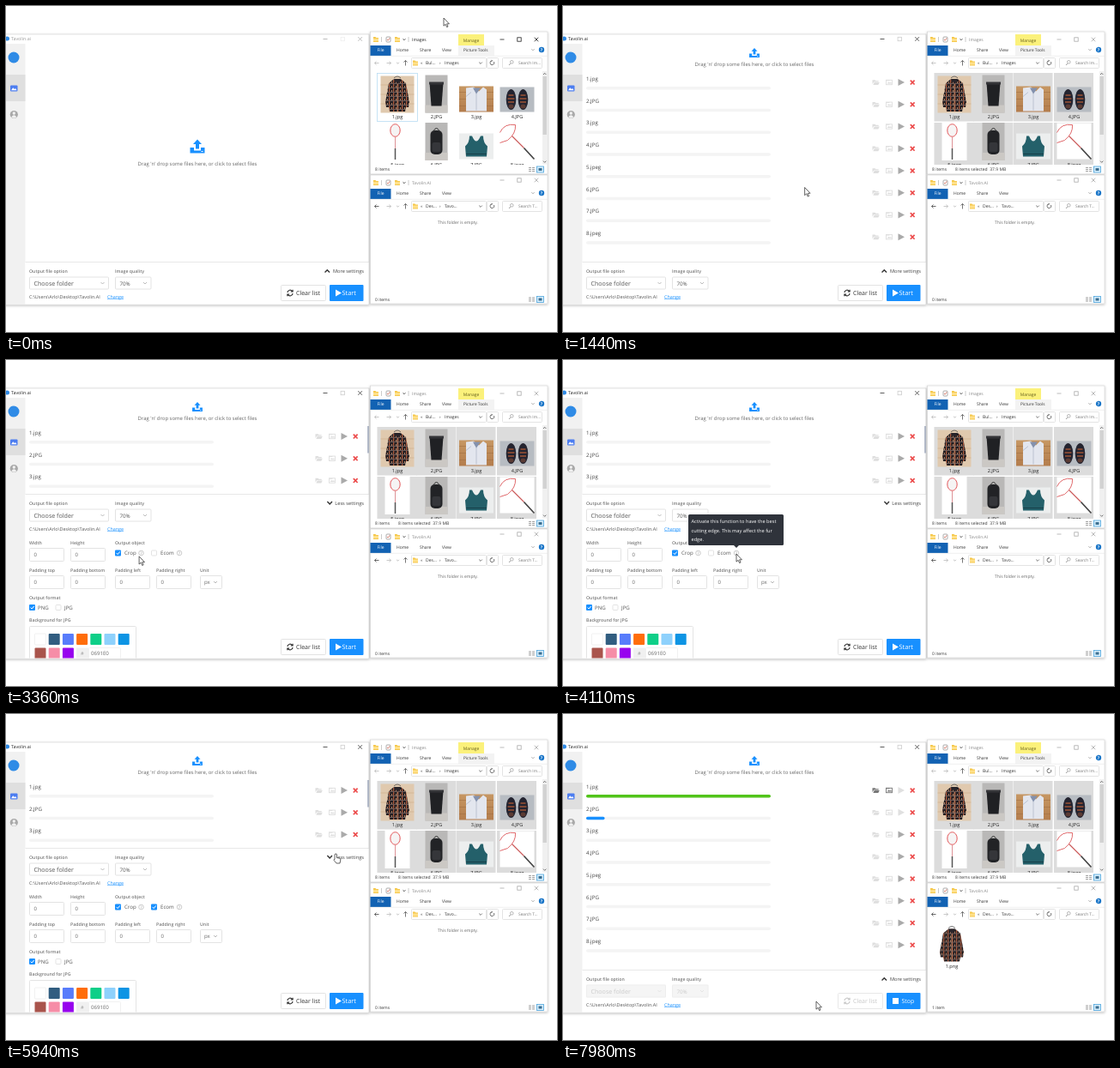
Write an HTML page that moves like this. It is 642x380 px and loops after 8000 ms.

```html
<!DOCTYPE html>
<html lang="en">
<head>
<meta charset="utf-8">
<title>Bulk background remover</title>
<style>
html, body { margin: 0; width: 100%; height: 100%; overflow: hidden; background: #fff; }
svg { display: block; width: 642px; height: 380px; }
text { font-family: "Open Sans", "Noto Sans", sans-serif; text-rendering: geometricPrecision; white-space: pre; }
</style>
</head>
<body>
<svg id="stage" viewBox="0 0 642 380" xmlns="http://www.w3.org/2000/svg"></svg>
<script>
(() => {
const LOOP = 8000;
const BLUE = '#1890ff';
const stage = document.getElementById('stage');

// Markup helpers
const text = (x, y, s, size = 5, fill = '#333', extra = '') =>
  `<text x="${x}" y="${y}" font-size="${size}" fill="${fill}" ${extra}>${s}</text>`;
const rect = (x, y, w, h, fill = 'none', extra = '') =>
  `<rect x="${x}" y="${y}" width="${w}" height="${h}" fill="${fill}" ${extra}/>`;
const box = (x, y, w, h, fill = '#fff', stroke = '#dcdcdc', r = 1) =>
  rect(x + .5, y + .5, w - 1, h - 1, fill, `stroke="${stroke}" stroke-width=".8" rx="${r}"`);
const line = (d, stroke = '#777', w = .8, extra = '') =>
  `<path d="${d}" fill="none" stroke="${stroke}" stroke-width="${w}" ${extra}/>`;
const shape = (d, fill, extra = '') => `<path d="${d}" fill="${fill}" ${extra}/>`;
const disc = (x, y, r, fill) => `<circle cx="${x}" cy="${y}" r="${r}" fill="${fill}"/>`;
const group = (id, body, extra = '') => `<g id="${id}" ${extra}>${body}</g>`;
const at = (x, y, body, s = 1) => `<g transform="translate(${x} ${y}) scale(${s})">${body}</g>`;
const chevron = (x, y, stroke = '#999', w = .8, r = 2) =>
  line(`M${x - r} ${y - r / 2}l${r} ${r}l${r} ${-r}`, stroke, w);
const folder = (x, y) =>
  shape(`M${x - 3} ${y - 3}h2.5l1 1h2.5v5h-6z`, '#f5c84c') + rect(x - 3, y - 1, 6, 3, '#ffe08a');

function windowButtons(x, y, gap, ink, boxInk = ink) {
  return line(`M${x - 2.5} ${y}h5`, ink) +
    rect(x + gap - 2.2, y - 2.2, 4.4, 4.4, 'none', `stroke="${boxInk}" stroke-width=".8"`) +
    line(`M${x + 2 * gap - 2.3} ${y - 2.3}l4.6 4.6m0 -4.6l-4.6 4.6`, ink);
}

const defs = `<defs>
  <pattern id="plaid" width="5" height="5" patternUnits="userSpaceOnUse">
    ${rect(0, 0, 5, 5, '#211e22')}${rect(0, 0, 1.3, 5, '#a9583c')}${rect(0, 2, 5, 1, '#6a5a58')}${rect(3, 0, .8, 2, '#d79a72')}
  </pattern>
  <linearGradient id="wood" x2="0" y2="1"><stop stop-color="#c69763"/><stop offset="1" stop-color="#b47d4d"/></linearGradient>
  <filter id="shadow" x="-10%" y="-10%" width="120%" height="120%">
    <feDropShadow dx="0" dy="1" stdDeviation="1.6" flood-color="#000" flood-opacity=".28"/>
  </filter>
  <clipPath id="files">${rect(425, 75, 200, 110)}</clipPath>
  <clipPath id="app">${rect(0, 33, 423, 314.5)}</clipPath>
</defs>`;

// Product pictures, each around its own centre
const jacket =
  line('M-4 -19q4 -4 8 0', '#555', .8) +
  shape('M-4 -18L4 -18L10 -13L14 9L13 15L10 15L9 20H-9L-10 15L-13 15L-14 9L-10 -13Z', 'url(#plaid)') +
  line('M0 -17V20', '#d39a74', .7) + shape('M-4 -18L0 -12L4 -18Z', '#28242a');
const jacketPhoto = rect(-19.5, -21.5, 39, 43, '#e0c9ae') +
  line('M-19.5 -11H19.5M-19.5 0H19.5M-19.5 11H19.5', '#cbab88', .6) + jacket;
const greyPhoto = rect(-13, -22, 26, 44, '#b9b8b7') + rect(-13, 13, 26, 9, '#cbc8c4');
const cup = shape('M-8 -13H8L6 14H-6Z', '#202124') + rect(-8.5, -14, 17, 3, '#343538');
const shirt = rect(-20, -15, 40, 30, 'url(#wood)') +
  line('M-20 -8H20M-20 0H20M-20 8H20', '#9b693e', .5) +
  shape('M-12 -13L-3 -14L3 -9L8 -14L12 -11V14H-12Z', '#e3e6ee') +
  shape('M-4 -13L0 -6L5 -13Z', '#8391ad') + line('M0 -7V13M-12 -3L-6 -8', '#aab2c5', .7);
const shoe = `<ellipse rx="5.8" ry="12" fill="#242430"/>` +
  line('M-3 -5H3M-4 -1H4M-3.5 3H3.5', '#d86837', 1.2) + `<ellipse cy="8" rx="3" ry="2.5" fill="#5b3b34"/>`;
const shoes = rect(-20, -14.5, 40, 29, '#b7bcc2') + at(-7, 0, shoe) + at(7, 0, shoe);
const racket = rect(-14.5, -22, 29, 44, '#fff') +
  `<ellipse cx="-2.5" cy="-13" rx="5.7" ry="7.3" fill="#f6f4f4" stroke="#e4585b" stroke-width="1"/>` +
  line('M-2.5 -5.5V8', '#d5777b', .8) + line('M-2.5 8V21', '#555', 1.5);
const bag = rect(-7, -13, 14, 28, '#222326', 'rx="5"') + rect(-5, 1, 10, 11, '#35363a', 'rx="2"') +
  line('M-3 -13q3 -5 6 0', '#333', 1);
const vest = rect(-20, -15, 40, 30, '#eceeee') +
  shape('M-8 -12L-5 -12Q0 0 5 -12L8 -12Q8 -4 13 0L12 12H-12L-13 0Q-8 -4 -8 -12Z', '#24606a') +
  line('M-12 9H12', '#163f49', 1);
const racketHead = rect(-20, -21, 40, 42, '#fff') +
  line('M-20 -10Q-15 -21 -2 -19Q-1 -9 -11 -1L-20 2', '#e0686b', 1) +
  line('M-6 -6L8 8', '#ca5656', 1.1) + line('M8 8L20 21', '#444', 1.7);

const columns = [456, 501.5, 548, 595.5];
const photos = [[jacketPhoto, 103], [greyPhoto + cup, 102.5], [shirt, 108.5], [shoes, 109],
                [racket, 158], [greyPhoto + bag, 158], [vest, 163.5], [racketHead, 157.5]];
const names = ['1.jpg', '2.JPG', '3.jpg', '4.JPG', '5.jpeg', '6.JPG', '7.JPG', '8.jpeg'];

function explorer(y, h, p) {
  const r = y + 21;
  return rect(424.5, y, 206.5, h, '#fff', 'stroke="#cfcfcf" stroke-width=".6" filter="url(#shadow)"') +
    folder(431, y + 9) + line(`M437.5 ${y + 6}v6M469 ${y + 6}v6`, '#aaa', .6) +
    box(442.5, y + 5.5, 6, 7, '#fff', '#999') + line(`M444 ${y + 9}l1.2 1.2l2 -3`, '#d36b5b') +
    folder(456, y + 9) + chevron(464, y + 9, '#444', 1, 1.4) +
    text(473, y + 11, p.title, 5, '#888', `id="${p.id}"`) +
    rect(424.5, y + 16, 24, 12, '#1262b3') + text(436.5, r + 2, 'File', 5, '#fff', 'text-anchor="middle"') +
    text(455, r + 2, 'Home') + text(482, r + 2, 'Share') + text(508, r + 2, 'View') +
    chevron(614, r, '#888', .7, 1.6) + disc(624, r, 3.2, '#1b76c8') +
    text(624, r + 1.8, '?', 5, '#fff', 'text-anchor="middle" font-weight="700"') +
    line(`M425 ${y + 28.3}H631`, '#e2e2e2', .6) +
    line(`M434.5 ${y + 36.5}h-5m2 -2l-2 2l2 2`, p.back) +
    line(`M443.5 ${y + 36.5}h5m-2 -2l2 2l-2 2`, '#bbb') + chevron(456.5, y + 36.5, '#999', .7, 1.3) +
    line(`M465.5 ${y + 39.5}v-6m-2 2l2 -2l2 2`, '#555') +
    box(472, y + 30, 88, 13) + folder(477, y + 36.5) + text(483, y + 38, '«', 5, '#555') +
    text(489, y + 38.3, p.parent) + text(505, y + 38, '›') + text(511, y + 38.3, p.here) +
    chevron(553, y + 36.5, '#555', .8, 1.8) + box(560, y + 30, 14, 13) +
    line(`M568.5 ${y + 35}a2.4 2.4 0 1 1 -2 -1.2l-1 -1m1 1l-1 1`, '#555', .8) +
    box(578, y + 30, 47, 13) + line(`M586 ${y + 39}l2 -2.2`, '#888') +
    `<circle cx="589.3" cy="${y + 35.3}" r="1.8" fill="none" stroke="#888" stroke-width=".6"/>` +
    text(597, y + 38.3, p.find, 4.8, '#777');
}
const viewIcons = y => line(`M609 ${y - 2}h3m1 0h3M609 ${y}h3m1 0h3M609 ${y + 2}h3m1 0h3`, '#888', .8) +
  box(618, y - 4, 9, 8, '#d8effd', '#4ba3db', 0) + rect(620.5, y - 1.5, 4, 3, '#3c6f91');

const cell = x => `<path d="M${x - 23.5} 78h46v56.5h-46zm0 58h46v50h-46z"/>`;

const imagesWindow = explorer(30, 166, { id: 'imgTitle', title: 'Images', back: '#bbb', parent: 'Bul...', here: 'Images', find: 'Search Im...' }) +
  rect(527, 33, 30, 13, '#fbf17b') + text(542, 41.5, 'Manage', 5, '#665f1e', 'text-anchor="middle"') +
  rect(527, 46, 42, 11.8, '#f3f3f3') + text(533, 53, 'Picture Tools', 4.8) +
  group('imgOn', windowButtons(578, 39, 20, '#222')) + group('imgOff', windowButtons(578, 39, 20, '#aaa')) +
  rect(625, 76, 5.5, 108.5, '#f0f0f0') + rect(625.5, 82, 4.5, 68, '#d2d2d2') +
  line('M626 80l1.7 -1.7l1.7 1.7', '#555') + chevron(627.7, 181.5, '#555', .8, 1.7) +
  `<g clip-path="url(#files)">` + group('cells', columns.map(cell).join('')) +
  group('focus', rect(432.5, 78.5, 47, 56, 'none', 'stroke="#b9dcf3" stroke-width=".8"')) +
  photos.map(([art, y], i) => at(columns[i % 4], y, art) +
    text(columns[i % 4], i < 4 ? 131 : 186.5, names[i], 5.6, '#222', 'text-anchor="middle"')).join('') + '</g>' +
  text(430, 192.3, '8 items') + group('picked', text(457, 192.3, '8 items selected  37.9 MB')) + viewIcons(190.5);

const outWindow = explorer(197, 150, { id: 'outTitle', title: 'Tavolin.AI', back: '#444', parent: 'Des...', here: 'Tavo...', find: 'Search T...' }) +
  windowButtons(578, 203, 20, '#aaa') +
  group('empty', text(526.5, 254, 'This folder is empty.', 5, '#666', 'text-anchor="middle"') + text(430, 344.3, '0 items')) +
  group('saved', at(453, 268.5, jacket) + text(453, 295.5, '1.png', 5.6, '#222', 'text-anchor="middle"') + text(430, 344.3, '1 item')) +
  viewIcons(342);

// App pieces
const upload = shape('M0 -8L5 -2.5H2V3H-2V-2.5H-5Z', BLUE) +
  shape('M-8.5 1.5H-4V5H4V1.5H8.5V8H-8.5Z', BLUE) + rect(4.5, 5.5, 2, 1, '#fff');
const label = (x, y, s) => text(x, y + 2, s, 5.2, '#777', 'font-weight="600"');
const input = (x, y) => box(x, y, 41, 16) + text(x + 5.5, y + 10.4, '0', 6, '#666');
const tick = (x, y) => rect(x, y, 7, 7, BLUE, 'rx="1"') + line(`M${x + 1.7} ${y + 3.5}l1.5 1.6l2.5 -3.2`, '#fff', 1);
const help = x => `<circle cx="${x}" cy="225" r="2.8" fill="none" stroke="#aaa" stroke-width=".6"/>` +
  text(x, 226.8, '?', 4.6, '#888', 'text-anchor="middle"');
const select = (x, w, s, size) => box(x, 315.5, w, 15) + text(x + 5.5, 325.6, s, size, '#555') + chevron(x + w - 7.5, 323, '#aaa');

function row(name, i) {
  const y = 89 + i * 25.75;
  return text(27, y - 2.2, name, 6.1, '#444') + rect(27, y + 4.9, 215, 3.7, '#f4f4f4', 'rx="1.8"') +
    rect(27, y + 4.9, 0, 3.7, BLUE, `id="bar${i}" rx="1.8"`) +
    group('icons' + i,
      shape(`M360.5 ${y - 2.8}h3l1 1h3.2v1.2h-5.5l-1.7 2.8z M362.8 ${y}h6l-1.5 3h-6z`, 'currentColor') +
      rect(376.5, y - 2.7, 7, 5.4, 'none', 'stroke="currentColor" stroke-width=".9"') +
      shape(`M377.5 ${y + 1.5}l2 -2l1.5 1l1 -1l1 2z M376.5 ${y - 2.8}h4v1h-4z`, 'currentColor'), 'color="#dedede"') +
    shape(`M390.5 ${y - 4}L398 ${y}L390.5 ${y + 4}Z`, '#aaa', `id="play${i}"`) +
    line(`M404.8 ${y - 2.3}l4.8 4.8m0 -4.8l-4.8 4.8`, '#ec4b4b', 1.7);
}

const swatches = ['#ffffff', '#315d80', '#587cfb', '#ff6d0a', '#0fcf88', '#8ed1fc', '#0d94e4', '#a9544c', '#f68da7', '#9704ee'];
const palette = box(27, 310, 125, 60, '#fff', '#ddd') + swatches.map((c, i) =>
  rect(33.5 + i % 7 * 16.2, i < 7 ? 319 : 335.5, 13, 13, c, `rx="1" ${i ? '' : 'stroke="#e8e8e8" stroke-width=".6"'}`)).join('') +
  rect(82, 335.5, 14, 13, '#f0f0f0') + text(87, 344.3, '#', 5.6, '#999') +
  box(96, 335, 38, 14, '#fff', '#eee') + text(99, 344.3, '0691E0', 6.1, '#666');

const more = label(27, 213, 'Width') + label(75, 213, 'Height') + label(127, 213, 'Output object') +
  input(27, 219) + input(75, 219) +
  box(127, 221.5, 7, 7) + box(169, 221.5, 7, 7) +
  group('crop', tick(127, 221.5)) + group('ecom', tick(169, 221.5)) +
  text(138, 227.3, 'Crop', 6.1, '#555') + text(180, 227.3, 'Ecom', 6.1, '#555') + help(157.5) + help(202) +
  ['top', 'bottom', 'left', 'right'].map((s, i) => {
    const x = [27, 75, 127, 175][i];
    return label(x, 245, 'Padding ' + s) + input(x, 251);
  }).join('') +
  label(226, 245, 'Unit') + box(226, 251, 26, 16) + text(231, 261, 'px', 6.1, '#666') + chevron(244, 259, '#aaa') +
  label(27, 277, 'Output format') + tick(27, 285) + text(37, 290.7, 'PNG', 6.1, '#555') +
  box(57.5, 285, 7, 7) + text(68, 290.7, 'JPG', 6.1, '#555') + label(27, 303, 'Background for JPG') + palette;

const settings = rect(22.5, 298.5, 400, 200, '#fff') + line('M22.5 298.5H423', '#e2e2e2') +
  label(27, 309, 'Output file option') + label(127, 309, 'Image quality') +
  group('selects', select(27, 93, 'Choose folder', 7.1) + select(127, 42.5, '70%', 6.2)) +
  group('locked', rect(27, 315.5, 93, 15, '#eee') + rect(127, 315.5, 42.5, 15, '#eee'), 'opacity=".55"') +
  text(27, 340.5, 'C:\\Users\\Arlo\\Desktop\\Tavolin.AI', 5.45, '#555') +
  text(118, 340.5, 'Change', 5.4, BLUE, 'text-decoration="underline"');

const reload = (x, y) => line(`M${x - 3} ${y - .5}a3 3 0 0 1 5.5 -1.5m.6 -1.8v2.3h-2.3M${x + 3} ${y + .5}a3 3 0 0 1 -5.5 1.5m-.6 1.8v-2.3h2.3`, 'currentColor', 1.2);

const app = rect(-2, 33, 425, 315, '#fff', 'stroke="#cfcfcf" stroke-width=".6" filter="url(#shadow)"') +
  `<g clip-path="url(#app)">` +
  rect(0, 44, 22.5, 304, '#f1f1f1') + rect(0, 80, 22.5, 31, '#dfdfdf') +
  disc(1.5, 38, 2.5, '#2f8be6') + text(6, 40, 'Tavolin.ai', 5.3, '#222', 'id="title"') +
  group('appOn', windowButtons(372, 38.5, 20.3, '#333', '#ccc')) + group('appOff', windowButtons(372, 38.5, 20.3, '#aaa', '#eee')) +
  disc(9, 60, 6.5, '#2f8be6') +
  rect(5, 92.5, 8.5, 7, '#4c7df0', 'rx="1"') + shape('M6 98.3l2.2 -3l1.6 1.7l1.2 -1l1.6 2.3z', '#fff') +
  disc(9.3, 126.5, 4.6, '#a9a9a9') + disc(9.3, 125, 1.7, '#f1f1f1') + shape('M6.3 129.5q3 -4.5 6 0q-3 2.5 -6 0z', '#f1f1f1') +
  group('tray', upload) + text(223, 0, "Drag 'n' drop some files here, or click to select files", 5.95, '#666', 'id="hint" text-anchor="middle"') +
  group('list', names.map(row).join('')) + group('scroll', rect(421, 77, 2, 31.5, '#b4bccb')) +
  group('settings', settings +
    group('toMore', line('M371.5 310.5l2.8 -2.8l2.8 2.8', '#333', 1.4) + text(417, 311, 'More settings', 5.7, '#444', 'text-anchor="end"')) +
    group('toLess', chevron(377.2, 308.5, '#333', 1.4, 2.8) + text(417, 311, 'Less settings', 5.7, '#444', 'text-anchor="end"'))) +
  group('more', more) +
  group('clear', box(320, 325, 53, 19) + reload(331, 334.5) + text(338, 337, 'Clear list', 7, 'currentColor')) +
  rect(377, 325, 39.5, 19, BLUE, 'rx="1"') +
  group('start', shape('M384 330.5L391 334.5L384 338.5Z', '#fff') + text(391.5, 337, 'Start', 7.4, '#fff')) +
  group('stop', rect(384, 331, 7, 7, '#fff') + text(394.5, 337, 'Stop', 6.9, '#fff')) +
  group('tip', rect(146, 180, 111, 36, '#2f333b', 'rx="1.5"') + shape('M199 216h6l-3 3z', '#2f333b') +
    ['Activate this function to have the best', 'cutting edge. This may affect the fur', 'edge.']
      .map((s, i) => text(149.5, 190.3 + i * 10.2, s, 5.65, '#fff')).join('')) + '</g>';

const ghost = group('ghost',
  `<g opacity=".6">${rect(-18, -40, 42, 52, '#b9bcc0')}${at(2, -17, jacketPhoto)}</g>` + at(0, -14, bag, .85) +
  rect(-3, -24, 6.5, 7, '#1a7fd0', 'stroke="#fff" stroke-width=".5"') +
  text(.3, -18.6, '8', 5, '#fff', 'text-anchor="middle"'), 'opacity=".8"');
const arrow = shape('M0 0V9.2L2.1 7.3L3.6 10.6L5 10L3.6 6.8H6.4Z', '#fff', 'stroke="#222" stroke-width=".7"');
const hand = shape('M1 0Q2.4 -.3 2.4 1V4.5L6.3 5.3Q7 5.6 6.8 7L6 11H2L-1 7.3Q-.8 6 0 6.5V1Q0 .2 1 0Z', '#fff', 'stroke="#222" stroke-width=".7"');

stage.innerHTML = defs + app + imagesWindow + outWindow +
  group('pointer', ghost + group('arrow', arrow) + group('hand', hand));

// Motion
const el = id => document.getElementById(id);
const show = (id, on) => el(id).setAttribute('display', on ? 'inline' : 'none');
const set = (id, key, value) => el(id).setAttribute(key, value);
const between = (t, a, b) => t >= a && t < b;

// time, x, y
const path = [[0, 510, 14], [120, 510, 14], [520, 458, 108], [700, 456, 108], [840, 443, 105], [1230, 225, 165],
  [1330, 225, 165], [1620, 398, 307], [1740, 398, 307], [1950, 278, 262], [2350, 92, 228], [2600, 98, 260],
  [2900, 131, 225], [3120, 131, 225], [3330, 155, 229], [3560, 157, 226], [4020, 202, 226], [4450, 202, 226],
  [4650, 173, 225], [4900, 173, 225], [5250, 62, 290], [5500, 90, 325], [5900, 383, 163], [6080, 383, 163],
  [6420, 392, 352], [6620, 399, 336], [6900, 399, 336], [7400, 330, 328], [7850, 295, 335], [8000, 295, 335]];

function pointerAt(t) {
  const i = path.findIndex(p => p[0] > t);
  const [a, x, y] = path[i - 1], [b, u, v] = path[i];
  const k = (t - a) / (b - a), e = k * k * (3 - 2 * k);
  return [x + (u - x) * e, y + (v - y) * e];
}

function draw(t) {
  const picked = t >= 600, dropped = t >= 1280;
  const open = between(t, 1690, 6030), running = t >= 6750;
  const [x, y] = pointerAt(t);
  const first = Math.min(1, Math.max(0, (t - 6800) / 750));
  const second = Math.max(0, (t - 7650) / 330) * 21.5;

  set('pointer', 'transform', `translate(${x} ${y})`);
  const overLink = between(t, 1580, 1770) || between(t, 5860, 6130) || between(t, 6560, 7020);
  show('hand', overLink);
  show('arrow', !overLink);
  show('ghost', between(t, 720, 1280));

  show('imgOn', !dropped);
  show('imgOff', dropped);
  set('imgTitle', 'fill', dropped ? '#888' : '#222');
  show('appOn', dropped);
  show('appOff', !dropped);
  set('title', 'fill', dropped ? '#222' : '#999');
  show('focus', !picked);
  show('picked', picked);
  set('cells', 'fill', !picked ? 'none' : dropped ? '#dcdcdc' : '#cce8ff');

  set('tray', 'transform', dropped ? 'translate(223 54.5) scale(.7)' : 'translate(223 163.5)');
  set('hint', 'y', dropped ? 70.3 : 186);
  show('list', dropped);
  show('scroll', open);
  set('settings', 'transform', `translate(0 ${open ? -142 : 0})`);
  show('more', open);
  show('toMore', !open);
  show('toLess', open);
  show('crop', t >= 3050);
  show('ecom', t >= 4780);
  show('tip', between(t, 4030, 4500));

  show('locked', running);
  set('selects', 'opacity', running ? .55 : 1);
  set('clear', 'color', running ? '#bbb' : '#333');
  set('clear', 'opacity', running ? .8 : 1);
  show('start', !running);
  show('stop', running);
  set('bar0', 'width', 215 * first);
  set('bar0', 'fill', first < 1 ? BLUE : '#52c41a');
  set('bar1', 'width', second);
  set('icons0', 'color', first < 1 ? '#dedede' : '#777');
  set('play0', 'fill', running ? '#e0e0e0' : '#aaa');
  set('play1', 'fill', second > 0 ? '#e0e0e0' : '#aaa');
  show('saved', first === 1);
  show('empty', first < 1);
}

function frame() {
  draw(performance.now() % LOOP);
  requestAnimationFrame(frame);
}
frame();
})();
</script>
</body>
</html>
```
